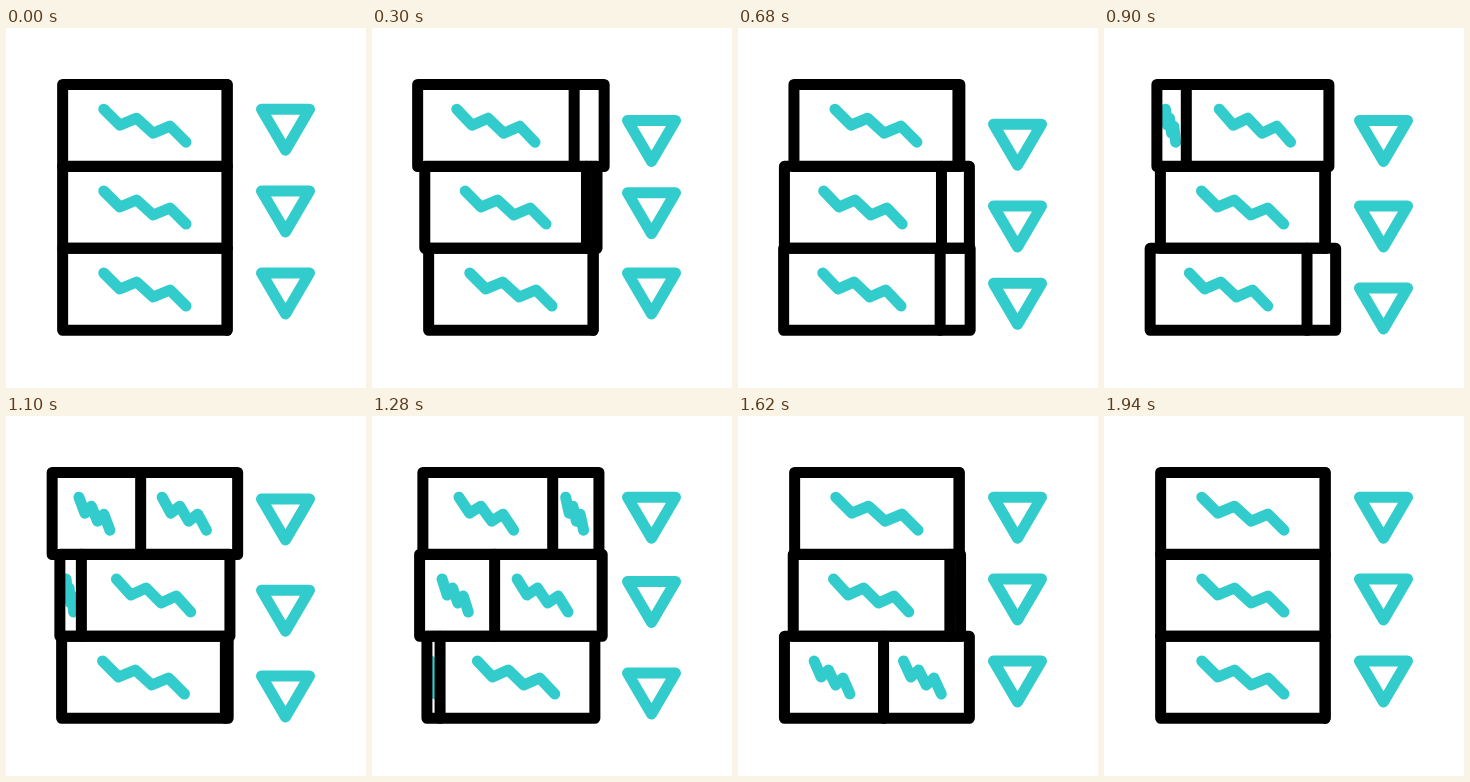
An HTML page with a canvas that plays this animation: 360 px wide and 360 px high, repeating every 2400 ms.

```html
<!DOCTYPE html>
<html>
<head>
<meta charset="utf-8">
<style>
html, body { margin: 0; width: 100%; height: 100%; overflow: hidden; background: #fff; }
canvas { display: block; }
</style>
</head>
<body>
<canvas id="stage" width="360" height="360"></canvas>
<script>
const ctx = document.getElementById('stage').getContext('2d');
const TEAL = '#33cccc', LOOP = 2400, CENTER = 138.9, WIDTH = 164.5, SWELL = 22;
const ZIG = [[-.5, 0], [-.305, 16], [-.1, 9], [.1, 24], [.305, 17], [.5, 33]];

// turn: start, halfway and end of the full quarter turn
const ROWS = [
  { y: 56.5, arrowDelay: 0, peekDelay: 0, turn: [730, 1160, 1410] },
  { y: 138.3, arrowDelay: 200, peekDelay: 200, turn: [945, 1410, 1685] },
  { y: 220.3, arrowDelay: 400, peekDelay: 430, turn: [1180, 1570, 1865] }
];

// Sine ease from 0 to 1 between two times
function ease(t, from, to) {
  const x = Math.min(1, Math.max(0, (t - from) / (to - from)));
  return (1 - Math.cos(Math.PI * x)) / 2;
}

function path(points, color, closed) {
  ctx.beginPath();
  points.forEach(([x, y]) => ctx.lineTo(x, y));
  if (closed) ctx.closePath();
  ctx.strokeStyle = color;
  ctx.stroke();
}

function zigzag(center, width, y) {
  path(ZIG.map(([x, dy]) => [center + x * width, y + 24.7 + dy]), TEAL);
}

function box(left, right, divider, y) {
  const bottom = y + 82;
  path([[left, y], [right, y], [right, bottom], [left, bottom]], '#000', true);
  path([[divider, y], [divider, bottom]], '#000');
}

function drawRow(t, { y, arrowDelay, peekDelay, turn: [start, half, end] }) {
  const p = (ease(t, start, half) + ease(t, half, end)) / 2;
  if (p > 0) {
    const w = WIDTH + SWELL * (1 - Math.abs(2 * p - 1));
    const left = CENTER - w / 2, right = left + w, divider = left + w * p;
    const q = 1 - p;
    const newRatio = .35 + .3 * Math.max(0, p - .5);
    const oldRatio = Math.min(.5, .32 + .26 * q);
    const oldShift = p < 1 ? 6 * Math.max(0, 1 - Math.abs(q - .6) / .42) : 0;
    zigzag((left + divider) / 2 - 2 * Math.sin(Math.PI * p), w * p * newRatio, y);
    if (q > .01) zigzag((divider + right) / 2 - oldShift, w * q * oldRatio, y);
    box(left, right, divider, y);
  } else {
    const u = t - peekDelay;
    const peek = ease(u, 0, 250) - ease(u, 430, 730);
    const w = WIDTH + SWELL * peek;
    const left = CENTER - w / 2, right = left + w, divider = right - 30 * peek;
    zigzag((left + divider) / 2, (divider - left) / 2, y);
    box(left, right, divider, y);
  }

  const v = t - arrowDelay;
  const top = y + 24.7 + 15 * (ease(v, 0, 450) - ease(v, 750, 1200));
  path([[255.5, top], [303.5, top], [279.5, top + 41]], TEAL, true);
}

function draw(now) {
  const t = now % LOOP;
  ctx.fillStyle = '#fff';
  ctx.fillRect(0, 0, 360, 360);
  ctx.lineWidth = 11;
  ctx.lineCap = ctx.lineJoin = 'round';
  ROWS.forEach(row => drawRow(t, row));
}

const begin = performance.now();
function tick() {
  draw(performance.now() - begin);
  requestAnimationFrame(tick);
}
tick();
</script>
</body>
</html>
```
